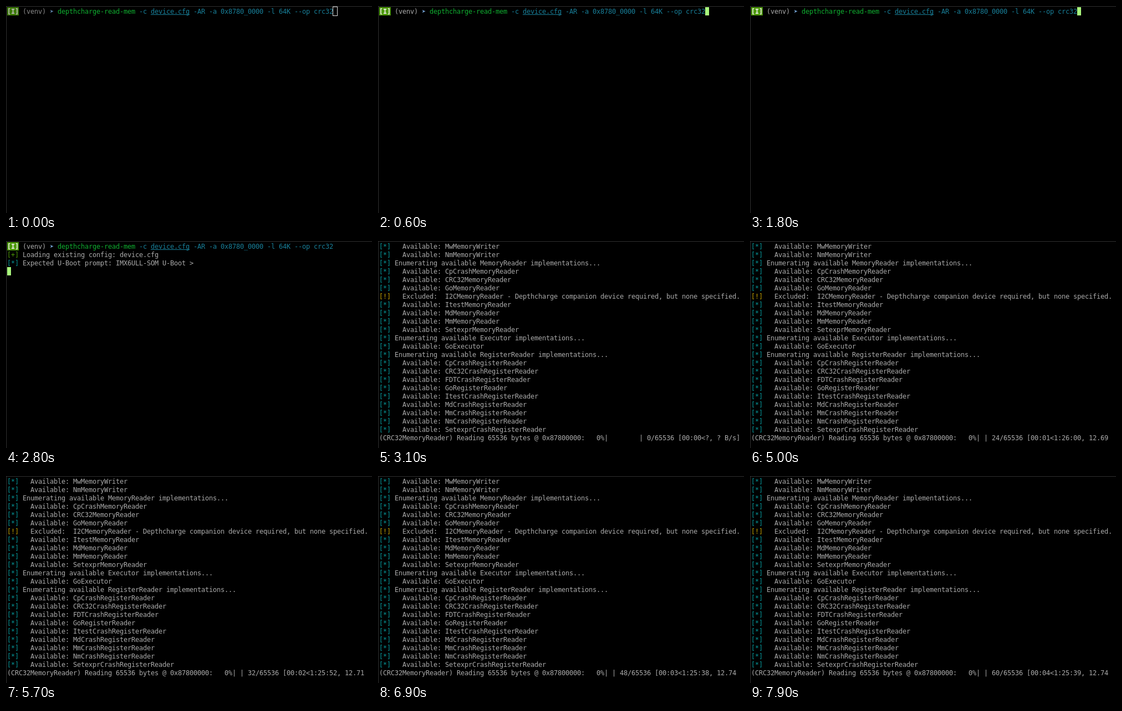
An HTML page with a canvas that plays this animation: 660 px wide and 373 px high, repeating every 8000 ms.

```html
<!DOCTYPE html>
<html lang="en">
<head>
<meta charset="utf-8">
<title>Terminal: reading memory</title>
<style>
  html, body { margin: 0; width: 100%; height: 100%; overflow: hidden; background: #000; }
  canvas { display: block; }
</style>
</head>
<body>
<canvas id="term" width="660" height="373"></canvas>
<script>
const ctx = document.getElementById('term').getContext('2d', { alpha: false });

const LOOP = 8000;
const CELL_W = 7, CELL_H = 15, PAD = 2, BASELINE = 12;
const COLS = 93;
const FONT = '12px "DejaVu Sans Mono", "DejaVu Sans", monospace';

const FG = '#aaaaaa', CURSOR = '#a8f57c';
const COMMAND = '#10ae30', PARAM = '#187f99';
const TAGS = { '+': '#4e9a06', '*': '#06989a', '!': '#c4a000' };

const available = (suffix, names) =>
  names.split(' ').map(name => `*   Available: ${name}${suffix}`);
const heading = kind => `* Enumerating available ${kind} implementations...`;

// The first character of each line selects its tag.
const LOG = [
  ...available('MemoryWriter', 'Mw Nm'),
  heading('MemoryReader'),
  ...available('MemoryReader', 'CpCrash CRC32 Go'),
  '!   Excluded:  I2CMemoryReader - Depthcharge companion device required, but none specified.',
  ...available('MemoryReader', 'Itest Md Mm Setexpr'),
  heading('Executor'),
  ...available('Executor', 'Go'),
  heading('RegisterReader'),
  ...available('RegisterReader',
    'CpCrash CRC32Crash FDTCrash Go ItestCrash MdCrash MmCrash NmCrash SetexprCrash')
];

const TOTAL = 65536, CHUNK = 4;
const UPDATES = [3500, 3800, 4100, 4400, 4700, 5000, 5300, 5700,
                 6000, 6300, 6600, 6900, 7200, 7500, 7900];
const RATES = [12.624, 12.645, 12.666, 12.676, 12.686, 12.696, 12.705, 12.714,
               12.724, 12.733, 12.741, 12.744, 12.752, 12.734, 12.741];

const cellX = col => PAD + col * CELL_W;
const cellY = row => PAD + row * CELL_H;

function put(text, col, row, color, bold = false) {
  ctx.font = (bold ? 'bold ' : '') + FONT;
  ctx.fillStyle = color;
  [...text].forEach((ch, i) => {
    if (ch !== ' ') ctx.fillText(ch, cellX(col + i), cellY(row) + BASELINE);
  });
}

function block(col, row, width, color) {
  ctx.fillStyle = color;
  ctx.fillRect(cellX(col), cellY(row), width * CELL_W, CELL_H);
}

function drawPrompt(focused) {
  block(0, 0, 3, focused ? '#4e9a06' : '#3e7b05');
  put('[I]', 0, 0, focused ? '#eeeeec' : '#bebebd', true);
  put('(venv)', 4, 0, focused ? FG : '#888888');
  put('➤', 11, 0, focused ? '#729fcf' : '#5b7fa6');
  put('depthcharge-read-mem', 13, 0, COMMAND);
  put('-c device.cfg -AR -a 0x8780_0000 -l 64K --op crc32', 34, 0, PARAM);
  ctx.fillStyle = PARAM;
  ctx.fillRect(cellX(37), cellY(0) + BASELINE + 1, 10 * CELL_W, 1);
}

function drawTagged(line, row) {
  put(`[${line[0]}]`, 0, row, TAGS[line[0]]);
  put(line.slice(1), 3, row, FG);
}

const pad2 = n => String(n).padStart(2, '0');

function clock(seconds) {
  const s = Math.floor(seconds);
  const h = Math.floor(s / 3600);
  return (h ? h + ':' : '') + pad2(Math.floor(s / 60) % 60) + ':' + pad2(s % 60);
}

function progressLine(t) {
  const done = UPDATES.filter(u => u <= t).length;
  const head = '(CRC32MemoryReader) Reading 65536 bytes @ 0x87800000:   0%|';
  if (!done) return `${head}${' '.repeat(8)}| 0/${TOTAL} [00:00<?, ? B/s]`;
  const n = done * CHUNK;
  const rate = RATES[done - 1];
  const shown = (Math.floor(rate * 100) / 100).toFixed(2);
  const eta = clock((TOTAL - n) / rate);
  return `${head} | ${n}/${TOTAL} [${clock(n / 12.7)}<${eta}, ${shown} B/s]`.slice(0, COLS);
}

function drawShell(t) {
  const focused = t >= 600;
  drawPrompt(focused);
  if (!focused) {
    ctx.strokeStyle = '#dddddd';
    ctx.lineWidth = 1;
    ctx.strokeRect(cellX(84) - 0.5, cellY(0) - 0.5, CELL_W + 1, CELL_H + 1);
  } else if (t < 2700) {
    const lit = t >= 2600 || Math.floor(t / 600) % 2 === 1;
    if (lit) block(84, 0, 1, CURSOR);
  } else if (t < 2800) {
    block(0, 1, 1, CURSOR);
  } else {
    drawTagged('+ Loading existing config: device.cfg', 1);
    drawTagged('* Expected U-Boot prompt: IMX6ULL-SOM U-Boot >', 2);
    block(0, 3, 1, CURSOR);
  }
}

function draw(t) {
  ctx.fillStyle = '#000';
  ctx.fillRect(0, 0, 660, 373);
  ctx.fillStyle = '#303030';
  ctx.fillRect(0, 0, 660, 1);
  ctx.fillRect(0, 0, 1, 373);
  if (t < 3100) {
    drawShell(t);
  } else {
    LOG.forEach(drawTagged);
    put(progressLine(t), 0, LOG.length, FG);
  }
}

const start = performance.now();
function tick() {
  draw((performance.now() - start) % LOOP);
  requestAnimationFrame(tick);
}
tick();
</script>
</body>
</html>
```
